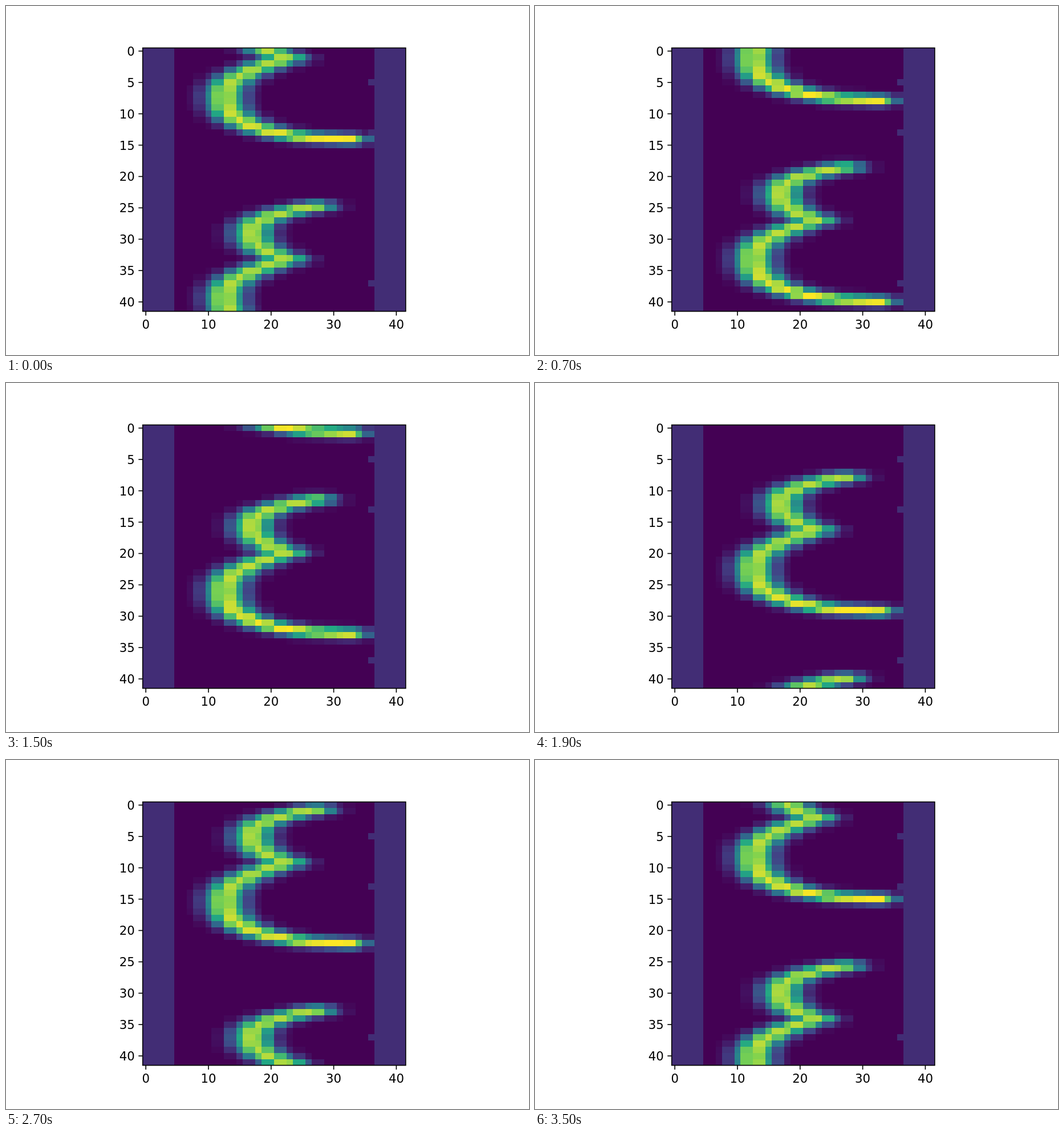
Recreate the animation shown at these times as an HTML page with a canvas. Size 917 by 611 pixels, loop 3.6 s.

```html
<!DOCTYPE html>
<html lang="en">
<head>
<meta charset="utf-8">
<title>Scrolling heatmap</title>
<style>
  html, body { margin: 0; width: 100%; height: 100%; overflow: hidden; background: #fff; }
  canvas { display: block; }
</style>
</head>
<body>
<canvas id="plot" width="917" height="611"></canvas>
<script>
const ctx = document.getElementById('plot').getContext('2d');
const LOOP = 3600, STEP = 100, PERIOD = 32, N = 42, PAD = 5;
const LEFT = 239.7, TOP = 73.4, CELL = 10.98, SIZE = N * CELL;
const SPREAD_X = 2.25, SPREAD_Y = .6, BIN = 1.6, PAD_VALUE = .13;

const VIRIDIS = [
  [68, 1, 84], [65, 68, 135], [42, 120, 142],
  [34, 168, 132], [122, 209, 81], [253, 231, 37]
];

const lerp = (a, b, k) => a + (b - a) * k;
const clamp = v => Math.min(1, Math.max(0, v));

// Turning points of the pulse as phase and column, joined by eased arcs
const easeIn = power => p => p ** power;
const easeOut = power => p => 1 - (1 - p) ** power;
const sweep = p => 1 - Math.sqrt(1 - p ** 2.6);
const TURNS = [[24.75, 27], [29, 17], [33.2, 22.6], [39, 12.6], [46.08, 32.2]];
const ARCS = [easeOut(2.6), easeIn(2.3), easeOut(2.1), sweep];

function tracePulse(samples) {
  const points = [];
  ARCS.forEach((ease, i) => {
    const [u0, x0] = TURNS[i], [u1, x1] = TURNS[i + 1];
    for (let s = 0; s < samples; s++) {
      const p = s / (samples - 1);
      const amp = ease === sweep ? lerp(.87, 1, p) : .89;
      points.push({ u: lerp(u0, u1, p), x: lerp(x0, x1, ease(p)), amp });
    }
  });
  return points;
}
const pulse = tracePulse(26);

// Strength falls off with the distance to the pulse, wide in x and narrow in y
function density(x, u) {
  let best = 0;
  for (let i = 1; i < pulse.length; i++) {
    const a = pulse[i - 1], b = pulse[i];
    const sx = (b.x - a.x) / SPREAD_X, sy = (b.u - a.u) / SPREAD_Y;
    const px = (x - a.x) / SPREAD_X, py = (u - a.u) / SPREAD_Y;
    const k = clamp((px * sx + py * sy) / (sx * sx + sy * sy || 1));
    const d2 = (px - k * sx) ** 2 + (py - k * sy) ** 2;
    best = Math.max(best, lerp(a.amp, b.amp, k) * Math.exp(-d2 / 2));
  }
  return best < .015 ? 0 : best;
}

// Columns share coarser bins, so some cells come in pairs
function binCenter(col) {
  const k = Math.floor((col - 11) / BIN);
  const first = Math.ceil(k * BIN), next = Math.ceil((k + 1) * BIN);
  return 11 + (first + next - 1) / 2;
}

function color(v) {
  const p = clamp(v) * (VIRIDIS.length - 1);
  const i = Math.min(VIRIDIS.length - 2, Math.floor(p));
  return `rgb(${VIRIDIS[i].map((c, n) => Math.round(lerp(c, VIRIDIS[i + 1][n], p - i)))})`;
}

function cellValue(col, row, shift) {
  const u = (row + shift) % PERIOD;
  const v = density(binCenter(col), u < 20 ? u + PERIOD : u);
  const notch = col === N - PAD - 1 && (row % PERIOD === 5 || row === 13);
  return notch ? Math.max(v, PAD_VALUE) : v;
}

function drawCells(step) {
  const shift = step * PERIOD * STEP / LOOP;
  const rows = Array.from({ length: N }, (_, row) =>
    Array.from({ length: N - 2 * PAD }, (_, i) => cellValue(i + PAD, row, shift)));
  const peak = Math.max(...rows.flat());
  const edge = (from, i) => Math.round(from + i * CELL);

  ctx.fillStyle = color(PAD_VALUE / peak);
  ctx.fillRect(LEFT, TOP, SIZE, SIZE);
  rows.forEach((values, row) => values.forEach((v, i) => {
    const x = edge(LEFT, i + PAD), y = edge(TOP, row);
    ctx.fillStyle = color(v / peak);
    ctx.fillRect(x, y, edge(LEFT, i + PAD + 1) - x, edge(TOP, row + 1) - y);
  }));
}

function line(x0, y0, x1, y1) {
  ctx.beginPath();
  ctx.moveTo(x0, y0);
  ctx.lineTo(x1, y1);
  ctx.stroke();
}

function drawAxes() {
  const tick = 7.4, bottom = TOP + SIZE;
  ctx.strokeStyle = ctx.fillStyle = '#000';
  ctx.lineWidth = 1.6;
  ctx.strokeRect(LEFT, TOP, SIZE, SIZE);
  ctx.font = '21.2px "DejaVu Sans", sans-serif';
  for (let n = 0; n <= 40; n += 5) {
    const offset = (n + .5) * CELL;
    const y = TOP + offset, x = LEFT + offset;
    line(LEFT - tick, y, LEFT, y);
    ctx.textAlign = 'right';
    ctx.fillText(n, LEFT - 2 * tick + .8, y + 8);
    if (n % 10) continue;
    line(x, bottom, x, bottom + tick);
    ctx.textAlign = 'center';
    ctx.fillText(n, x, bottom + 30.9);
  }
}

const start = performance.now();
let shown = -1;

function frame() {
  const step = Math.floor((performance.now() - start) % LOOP / STEP);
  if (step !== shown) {
    shown = step;
    ctx.fillStyle = '#fff';
    ctx.fillRect(0, 0, 917, 611);
    drawCells(step);
    drawAxes();
  }
  requestAnimationFrame(frame);
}
frame();
</script>
</body>
</html>
```
